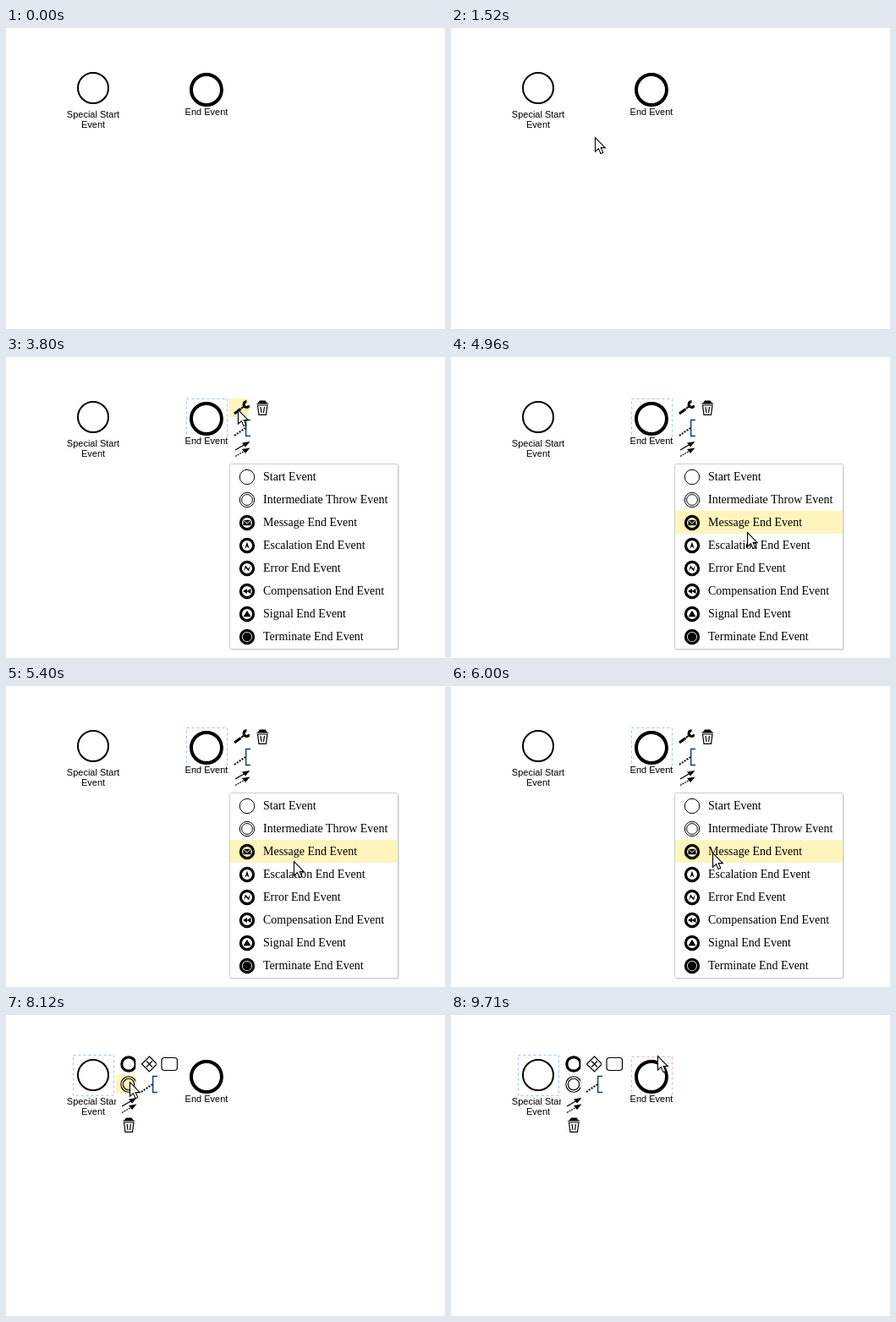
These frames come from a looping animation (519x356 px, 9.73 s). An HTML page:

```html
<!DOCTYPE html>
<html>
<head>
<meta charset="utf-8">
<style>
html, body { margin: 0; width: 100%; height: 100%; overflow: hidden; background: #fff; }
svg { display: block; }
.label { font: 11px "Liberation Sans", Arial, sans-serif; text-anchor: middle; }
.row { font: 14px "Liberation Serif", Times, serif; }
.outline { fill: none; stroke-dasharray: 3 3; }
.line { fill: none; stroke: #000; }
</style>
</head>
<body>
<svg id="stage" width="519" height="356"></svg>
<script>
const LOOP = 9730, YELLOW = '#fff5bc', SELECTED = '#9cc4ec', HOVERED = '#e6b4b4';
const $ = id => document.getElementById(id);
const ring = (r, w) => `<circle class="line" r="${r}" stroke-width="${w}"/>`;
const line = (d, w = 1.2, extra = '') => `<path class="line" d="${d}" stroke-width="${w}" ${extra}/>`;
const solid = d => `<path d="${d}"/>`;
const at = (x, y, body) => `<g transform="translate(${x} ${y})">${body}</g>`;
const cut = body => `<g clip-path="url(#cut)">${body}</g>`;
const arrow = (y, dash) => at(0, y, line('M-8 2L4-5', 1.3, dash) + solid('M9.5-8L0-6.5 4-1.5Z'));

const icons = {
  end: cut(ring(8.2, 3.2)),
  mid: cut(ring(9.2, 1.1) + ring(6.7, 1.1)),
  gateway: line('M.5-9L9.5 0 .5 9-8.5 0Z') + line('M-3-3.5L4 3.5M4-3.5L-3 3.5'),
  task: '<rect class="line" x="-9" y="-7.5" width="18.5" height="15" rx="3.5" stroke-width="1.2"/>',
  note: line('M-9 9L4 0', 2, 'stroke-dasharray="2 1.5"') + line('M10-9.5H4.7V9.5H10', 1.4, 'style="stroke:#123c70"'),
  connect: arrow(0, '') + arrow(7.5, 'stroke-dasharray="2 1"'),
  trash: solid('M-7.5-4.5Q-4-6-3-8.5H3.5Q4.5-6 8-4.5Z') + line('M-5.5-3L-4 8.3H4.5L6-3Z') + line('M-2-1L-1 6M2.5-1L1.5 6'),
  wrench: line('M-9 7L-1.5 1.5', 3) + line('M-1 1L3-2', 2) + line('M8.5-2.8A3.3 3.3 0 1 1 5.5-7.2', 3)
};

const items = [
  ['Start', ring(8.7, 1)],
  ['Intermediate Throw', ring(8.7, 1) + ring(6.4, 1)],
  ['Message End', solid('M-4.5-3.2H4.5V3.2H-4.5Z') + line('M-4.5-3L0 .8 4.5-3', 1, 'style="stroke:#fff"')],
  ['Escalation End', solid('M0-4.5L2.7 4 0 1-2.7 4Z')],
  ['Error End', solid('M-4 4L-2-3.5 1.5 .5 4-4 2 3.5-1.5-.5Z')],
  ['Compensation End', solid('M0-3V3L-5 0ZM4.5-3V3L-.5 0Z')],
  ['Signal End', solid('M0-4.2L4.5 3.2H-4.5Z')],
  ['Terminate End', '<circle r="5.2"/>']
];

// Areas that light up under the pointer
const spots = [];
const spot = (owner, x, y, w, h) => {
  spots.push({ owner, x, y, w, h });
  return `<rect id="spot${spots.length - 1}" x="${x}" y="${y}" width="${w}" height="${h}"/>`;
};
const pad = (id, left, top, rows) => `<g id="${id}">` + rows.split('/').map((row, r) =>
  row.split(' ').map((icon, c) => {
    const x = left + 24 * c, y = top + 24 * r;
    return spot(id, x, y, 23, 22) + at(x + 15, y + 11, icons[icon]);
  }).join('')).join('') + '</g>';
const menu = () => `<g id="menu">
  <rect x="265" y="128" width="200" height="219" rx="2" opacity=".1"/>
  <rect x="264.5" y="126.5" width="199" height="219" rx="2" fill="#fff" stroke="#ccc"/>` +
  items.map(([name, icon], i) => {
    const y = 128 + 27 * i;
    return spot('menu', 265, y, 198, 27) +
      at(285, y + 14, (i > 1 ? ring(7.6, 3.2) : '') + icon) +
      `<text class="row" x="304" y="${y + 18}">${name} Event</text>`;
  }).join('') + '</g>';
const outline = (id, x, y) => `<rect id="${id}" class="outline" x="${x}.5" y="${y}.5" width="48" height="48"/>`;
const label = (x, y, text) => `<text class="label" x="${x}" y="${y}">${text}</text>`;

$('stage').innerHTML = '<clipPath id="cut"><rect x="-11" y="-11" width="19.3" height="22"/></clipPath>' +
  outline('startBox', 79, 47) + outline('endBox', 213, 49) +
  at(103, 71, ring(18, 2)) + at(237, 73, ring(18, 4)) +
  label(103, 106, 'Special Start') + label(103, 118, 'Event') + label(237, 103, 'End Event') +
  pad('endPad', 264, 49, 'wrench trash/note/connect') +
  pad('startPad', 130, 47, 'end gateway task/mid note/connect/trash') + menu() +
  '<path id="cursor" d="M.5.5V17.2L4.4 13.6 7 19.6 9.8 18.4 7.2 12.6H12.3Z" fill="#fff" stroke="#000" stroke-width="1.1"/>';

// Pointer moves: start, end, destination x, y; it rests in between
const ENTRY = [366, 331];
const moves = [
  [600, 1520, 170, 129], [1520, 1800, 277, 62], [1800, 1990, 218, 72],
  [2720, 3080, 274, 62], [4520, 5150, 371, 247], [5150, 5480, 335, 200],
  [5520, 5770, 325, 209], [5900, 6470, 138, 62], [6820, 7140, 108, 72],
  [7680, 8120, 146, 79], [8180, 8630, 148, 62], [8670, 9050, 147, 60],
  [9470, 9700, 244, 48]
];
const ease = k => k * k * (3 - 2 * k);
const tip = t => moves.reduce(([x, y], [from, to, toX, toY]) => {
  const k = ease(Math.min(1, Math.max(0, (t - from) / (to - from))));
  return [x + (toX - x) * k, y + (toY - y) * k];
}, ENTRY).map(Math.round);

const show = (id, on) => $(id).setAttribute('visibility', on ? 'visible' : 'hidden');

function draw(now) {
  const t = now % LOOP, moving = t >= 600;
  const [x, y] = tip(t);
  const inside = (l, u, w, h) => moving && x >= l && x < l + w && y >= u && y < u + h;
  const open = {
    endPad: t >= 2190 && t < 6820,
    menu: t >= 3800 && t < 6820,
    startPad: t >= 7470
  };
  const frame = (id, selected, hovered) => {
    show(id, selected || hovered);
    $(id).setAttribute('stroke', hovered ? HOVERED : SELECTED);
  };
  for (const id in open) show(id, open[id]);
  frame('startBox', open.startPad, inside(78, 46, 51, 51));
  frame('endBox', open.endPad, inside(212, 48, 51, 51));
  spots.forEach((s, i) => {
    const hot = open[s.owner] && inside(s.x, s.y, s.w, s.h);
    $('spot' + i).setAttribute('fill', hot ? YELLOW : '#fff');
  });
  show('cursor', moving);
  $('cursor').setAttribute('transform', `translate(${x} ${y})`);
  requestAnimationFrame(() => draw(performance.now()));
}
draw(0);
</script>
</body>
</html>
```
